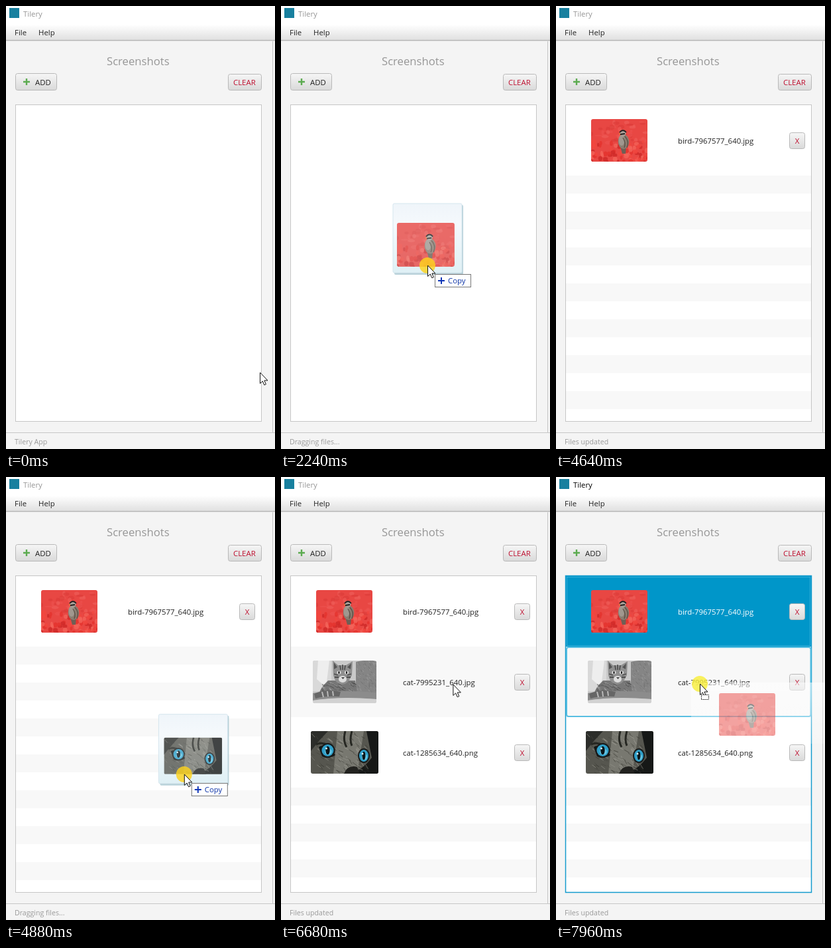
An HTML page for the animation above (8000 ms loop, 406 by 666 pixels).

```html
<!DOCTYPE html>
<html lang="en">
<head>
<meta charset="utf-8">
<title>Tilery</title>
<style>
html, body { margin: 0; width: 100%; height: 100%; overflow: hidden; background: #f4f4f4; }
svg { display: block; width: 100%; height: 100%; }
text { font: 11.4px "Open Sans", "Noto Sans", sans-serif; fill: #222; }
.small { font-size: 10.6px; fill: #9a9a9a; }
.head { font-size: 16.7px; fill: #979797; }
.red { fill: #bf1030; }
.btn { fill: url(#face); stroke: #b9b9b9; }
</style>
</head>
<body>
<svg id="stage" viewBox="0 0 406 666" preserveAspectRatio="none"></svg>
<script>
const LOOP = 8000, TOP = 149, ROW = 106;
const files = [
  { id: 'bird', x: 53, w: 85, name: 'bird-7967577_640.jpg' },
  { id: 'cat', x: 48, w: 96, name: 'cat-7995231_640.jpg' },
  { id: 'eyes', x: 45, w: 102, name: 'cat-1285634_640.png' }
];

let seed = 7;
const rnd = (a = 0, b = 1) => {
  seed = seed * 16807 % 2147483647;
  return a + (b - a) * seed / 2147483647;
};
const pick = list => list[Math.floor(rnd(0, list.length))];
const many = (n, fn) => Array.from({ length: n }, (_, i) => fn(i)).join('');
const rect = (x, y, w, h, attrs) => `<rect x="${x}" y="${y}" width="${w}" height="${h}" ${attrs}/>`;
const oval = (x, y, rx, ry, attrs) => `<ellipse cx="${x}" cy="${y}" rx="${rx}" ry="${ry}" ${attrs}/>`;
const path = (d, attrs) => `<path d="${d}" ${attrs}/>`;
const text = (x, y, str, attrs = '') => `<text x="${x}" y="${y}" ${attrs}>${str}</text>`;
const thumb = (id, w, art) =>
  `<clipPath id="${id}Clip">${rect(0, 0, w, 64, 'rx="3"')}</clipPath><g id="${id}" clip-path="url(#${id}Clip)">${art}</g>`;

// Short seeded hairs inside a box
const fur = (n, x, y, w, h, dx, dy, colors) => many(n, () =>
  path(`M${rnd(x, x + w).toFixed(1)} ${rnd(y, y + h).toFixed(1)}l${(dx * rnd(.5, 1.3)).toFixed(1)} ${(dy * rnd(.5, 1.3)).toFixed(1)}`,
    `stroke="${pick(colors)}" stroke-width="1" opacity=".6"`));

const birdArt = rect(0, 0, 85, 64, 'fill="#e84743"') +
  many(40, () => oval(rnd(0, 85), rnd(0, 36), rnd(2, 6), rnd(1, 4), `fill="${pick(['#f0605a', '#dc3b38', '#ee5450'])}" opacity=".6"`)) +
  many(75, () => oval(rnd(0, 85), rnd(34, 64), rnd(1.5, 4), rnd(2, 4), `fill="${pick(['#f2463f', '#cf2927', '#e5322e', '#f4655b'])}" opacity=".8"`)) +
  path('M44 41L47 52L52 52L53 41Z', 'fill="#6f5f55"') +
  oval(49, 34, 8.3, 11, 'fill="#8b7d70"') +
  oval(46, 32, 4.5, 8, 'fill="#a0988f"') +
  path('M51 26q7 7 3 17M48 28q5 8 2 15', 'fill="none" stroke="#5d5047" stroke-width="1.4"') +
  oval(48, 21, 4.5, 4.5, 'fill="#aaa29b"') +
  path('M43 20q5 -6 10 0M44 23l7 -1', 'fill="none" stroke="#241f1f" stroke-width="1.8"') +
  path('M44 21l-3 1l3 1Z', 'fill="#d98a30"');

const catArt = rect(0, 0, 96, 64, 'fill="#c9c9c9"') +
  rect(0, 0, 28, 46, 'fill="#d9d9d9"') + path('M8 0L25 0L20 40L6 28Z', 'fill="#eee"') +
  path('M65 2Q80 -2 96 1V52H65Z', 'fill="#858585"') +
  fur(90, 66, 0, 30, 50, 2, 3, ['#666', '#a5a5a5', '#777']) +
  path('M23 30Q10 42 8 54H68L64 30Z', 'fill="#777"') +
  fur(60, 12, 32, 50, 18, 5, 3, ['#333', '#bbb', '#555']) +
  path('M30 0L38 7H50L60 1L59 22Q53 36 44 36Q33 34 31 22Z', 'fill="#8f8f8f"') +
  path('M32 3l5 7l-5 3ZM58 4l-6 6l5 3Z', 'fill="#555"') +
  path('M41 7l1 7M45 6v8M49 7l-1 7M32 20l6 2M58 20l-6 2M33 25l6 0M57 25l-6 0', 'stroke="#3a3a3a" stroke-width="1.3"') +
  oval(39.5, 18, 3, 2.4, 'fill="#e3e3e3"') + oval(51, 18, 3, 2.4, 'fill="#e3e3e3"') +
  oval(39.5, 18, 1.2, 2, 'fill="#111"') + oval(51, 18, 1.2, 2, 'fill="#111"') +
  oval(45, 28, 6, 5, 'fill="#ddd"') + path('M43 25h5l-2.5 3Z', 'fill="#444"') +
  path('M0 49Q30 43 96 48V58Q40 53 0 60Z', 'fill="#8c8c8c"') +
  path('M2 50Q20 42 42 47L40 54Q18 53 4 57Z', 'fill="#666"') +
  path('M14 47l2 8M22 46l1 8M30 46l1 7', 'stroke="#bbb" stroke-width="2"') +
  path('M0 60Q40 54 96 58V64H0Z', 'fill="#d2d2d2"');

const eye = (x, y, rx, ry) => oval(x, y, rx + 2, ry + 2, 'fill="#181b1b"') +
  oval(x, y, rx, ry, 'fill="#2f9fc9"') + oval(x + 1, y + 2, rx * .6, ry * .5, 'fill="#65c4e2"') +
  oval(x, y, rx * .35, ry * .7, 'fill="#0a1418"') + oval(x - 2, y - 3, 1.5, 1.5, 'fill="#d8f2fa"');
const eyesArt = rect(0, 0, 102, 64, 'fill="#56564f"') +
  path('M40 0H80L70 64H34Z', 'fill="#787870"') +
  path('M84 0H102V64H62Q80 56 92 40Z', 'fill="#161817"') +
  path('M0 0H26Q12 14 0 30Z', 'fill="#2c2d2a"') +
  fur(110, 0, 0, 84, 62, 6, 5, ['#303029', '#96968d', '#45453f', '#aaa9a0']) +
  path('M8 20Q20 14 36 28M52 0Q48 14 54 24M62 0Q58 14 62 22', 'fill="none" stroke="#262722" stroke-width="3"') +
  path('M12 24Q22 17 37 36Q26 43 17 38Z', 'fill="#111514"') +
  eye(25.5, 29, 9, 9) + eye(80, 37, 7, 9) +
  path('M50 64Q56 50 70 54L74 64Z', 'fill="#22221f"');

const defs = `<defs>
  <linearGradient id="bar" x2="0" y2="1"><stop stop-color="#fff"/><stop offset="1" stop-color="#e0e0e0"/></linearGradient>
  <linearGradient id="face" x2="0" y2="1"><stop stop-color="#f6f6f6"/><stop offset="1" stop-color="#d9d9d9"/></linearGradient>
  <linearGradient id="pane" x2="0" y2="1"><stop stop-color="#eff5fa"/><stop offset=".3" stop-color="#f5f9fc"/><stop offset="1" stop-color="#dff0f5"/></linearGradient>
  <linearGradient id="veil" x2="0" y2="1"><stop stop-color="#fff" stop-opacity=".55"/><stop offset="1" stop-color="#fff" stop-opacity=".2"/></linearGradient>
  ${thumb('bird', 85, birdArt)}${thumb('cat', 96, catArt)}${thumb('eyes', 102, eyesArt)}
</defs>`;

const frame = rect(0, 0, 406, 666, 'fill="#f4f4f4"') +
  rect(0, 0, 406, 28, 'fill="#fff"') +
  rect(5, 3, 15, 15, 'fill="#18809f"') +
  text(26, 16, 'Tilery', 'id="title"') +
  rect(0, 28, 406, 23, 'fill="url(#bar)"') + rect(0, 51, 406, 1.4, 'fill="#b4b4b4"') +
  text(13, 44, 'File') + text(49, 44, 'Help') +
  rect(402, 53, 1, 588, 'fill="#c4c4c4"') +
  text(152, 89, 'Screenshots', 'class="head"') +
  rect(14.5, 101.5, 62, 25, 'rx="3" class="btn"') +
  path('M31 109v10M26 114h10', 'stroke="#5cab50" stroke-width="2.4"') + text(44, 119, 'ADD') +
  rect(335.5, 102.5, 50, 24, 'rx="3" class="btn"') + text(343, 119, 'CLEAR', 'class="red"') +
  rect(0, 641, 406, 1, 'fill="#c6c6c6"') + text(13, 659, '', 'id="status" class="small"');

const entry = (f, i, selected) => {
  const y = TOP + i * ROW;
  return rect(15, y, 370, ROW, `fill="${selected ? '#0096c9' : i % 2 ? '#f8f8f8' : '#fff'}"`) +
    (selected ? rect(16.5, y + 1.5, 367, ROW - 3, 'fill="none" stroke="#3db2da" stroke-width=".8"') : '') +
    `<use href="#${f.id}" x="${f.x}" y="${y + 21}"/>` +
    text(184, y + 58, f.name, selected ? 'style="fill:#fff"' : '') +
    rect(352.5, y + 41.5, 23, 24, 'rx="3" class="btn"') +
    text(364, y + 58, 'X', 'class="red" text-anchor="middle"');
};

const listArt = (count, focused) => {
  let out = rect(15, 149, 370, 475, 'fill="#fff"');
  if (count) {
    for (let y = TOP + count * ROW; y < 624; y += 54) out += rect(15, y, 370, Math.min(27, 624 - y), 'fill="#f8f8f8"');
  }
  out += files.slice(0, count).map((f, i) => entry(f, i, focused && !i)).join('');
  return out + rect(14.5, 148.5, 371, 476, `fill="none" stroke="${focused ? '#149bcd' : '#c6c6c6'}" stroke-width="${focused ? 1.5 : 1}"`);
};

const pane = art => rect(2, 2, 104, 105, 'rx="2" fill="#9cbfca" opacity=".7"') +
  rect(0, 0, 104, 104, 'rx="2" fill="url(#pane)" stroke="#d5e6ee"') + art;

document.getElementById('stage').innerHTML = defs + frame + `
  <g id="list"></g>
  <rect id="target" x="16" y="256" width="368.5" height="104" rx="3" fill="none" stroke="#58bfe2" stroke-width="2"/>
  <g id="oneFile">${pane('<use href="#bird" transform="translate(6 29) scale(1.023 1.03)" opacity=".8"/>')}</g>
  <g id="twoFiles">${pane('<use href="#eyes" transform="translate(8 35) scale(.86)" opacity=".8"/>')}</g>
  <g id="rowGhost">${rect(-4, 5, 202, 92, 'fill="url(#veil)"')}<use href="#bird" x="38" y="21" opacity=".5"/></g>
  <circle id="press" r="12"/>
  <g id="cursor">
    ${path('M.5 0V16.5L4.3 13L6.8 18.8L9.4 17.7L6.9 12H12Z', 'fill="#fff" stroke="#111" stroke-linejoin="round"')}
    <rect id="dash" x="2.5" y="16.5" width="11" height="7" fill="#fff" stroke="#111" stroke-dasharray="1.5 1"/>
  </g>
  <g id="copy">
    ${rect(.5, .5, 54, 19, 'fill="#fff" stroke="#777"')}
    ${path('M10 5v10M5 10h10', 'stroke="#1137b8" stroke-width="2"')}
    ${text(20, 14, 'Copy', 'style="fill:#1137a8"')}
  </g>`;

const el = {};
document.querySelectorAll('#stage [id]').forEach(n => el[n.id] = n);
const show = (node, on) => node.setAttribute('display', on ? 'inline' : 'none');
const move = (node, x, y) => node.setAttribute('transform', `translate(${x.toFixed(2)} ${y.toFixed(2)})`);
const clamp = v => Math.max(0, Math.min(1, v));
const inOut = u => u * u * (3 - 2 * u);
const out = u => 1 - (1 - u) * (1 - u);

const glide = (t, t0, t1, a, b, ease = out) => {
  const u = ease(clamp((t - t0) / (t1 - t0)));
  return [a[0] + (b[0] - a[0]) * u, a[1] + (b[1] - a[1]) * u];
};
const bend = (u, a, b, c) => a.map((v, i) => (1 - u) ** 2 * v + 2 * u * (1 - u) * b[i] + u * u * c[i]);

const firstDrag = t => glide(t, 1840, 2240, [411, 421], [221, 390]);
const secondDrag = t => glide(t, 4640, 5080, [460, 470], [219, 441]);

function pointer(t) {
  if (t < 240) return [383, 551];
  if (t < 1840) return null;
  if (t < 2640) return firstDrag(t);
  if (t < 2920) return glide(t, 2640, 2880, [221, 390], [372, 470], u => u * u);
  if (t < 4640) return null;
  if (t < 5920) return secondDrag(t);
  if (t < 6240) return [222, 439];
  if (t < 7080) return bend(inOut(clamp((t - 6200) / 840)), [222, 439], [288, 330], [238, 235]);
  if (t < 7440) return glide(t, 7080, 7240, [238, 235], [237, 228]);
  if (t < 7640) return glide(t, 7440, 7640, [237, 228], [232, 246], u => u * u);
  if (t < 7880) return glide(t, 7640, 7880, [232, 246], [217, 297], u => u);
  return t < 7960 ? [217, 297] : [217, 311];
}

let listKey = '';
function draw(time) {
  const step = time >= 1840 && time < 2640 ? 80 : 40;
  const t = Math.floor(time / step) * step;
  const one = t >= 1840 && t < 2640, two = t >= 4640 && t < 5280;
  const focused = t >= 7280, rowDrag = t >= 7480;
  const p = pointer(t);

  const count = t < 2640 ? 0 : t < 5280 ? 1 : 3;
  const key = count + '|' + focused;
  if (key !== listKey) el.list.innerHTML = listArt(count, focused);
  listKey = key;

  const over = (one || two) && p[0] < 385;
  el.status.textContent = over ? 'Dragging files...' : count ? 'Files updated' : 'Tilery App';
  el.title.style.fill = focused ? '#000' : '#979797';

  // The dragged pane trails the pointer slightly
  show(el.oneFile, one);
  show(el.twoFiles, two);
  if (one) {
    const lag = 30 * (1 - clamp((t - 1840) / 400));
    move(el.oneFile, p[0] - 52 + lag, p[1] - 93 + lag / 5);
  }
  if (two) {
    const lag = 30 * (1 - clamp((t - 4640) / 440));
    move(el.twoFiles, p[0] - 52 + lag, p[1] - 93 + lag / 5);
  }
  show(el.copy, over);
  if (over) move(el.copy, p[0] + 11, p[1] + 13);

  show(el.cursor, p);
  if (p) move(el.cursor, p[0], p[1]);
  show(el.dash, rowDrag);

  const pressed = one || two || focused;
  show(el.press, pressed);
  if (pressed) {
    const onBlue = focused && p[1] < 255;
    move(el.press, p[0] - (onBlue ? 1 : 0), p[1]);
    el.press.setAttribute('fill', onBlue ? '#74c365' : focused ? '#f8ee3c' : '#fcd21c');
    el.press.setAttribute('opacity', onBlue ? 1 : .82);
  }

  show(el.target, rowDrag && p[1] > 255);
  show(el.rowGhost, rowDrag);
  if (rowDrag) move(el.rowGhost, p[0] - 9, p[1] - 7);
}

const start = performance.now();
function tick() {
  draw((performance.now() - start) % LOOP);
  requestAnimationFrame(tick);
}
tick();
</script>
</body>
</html>
```
